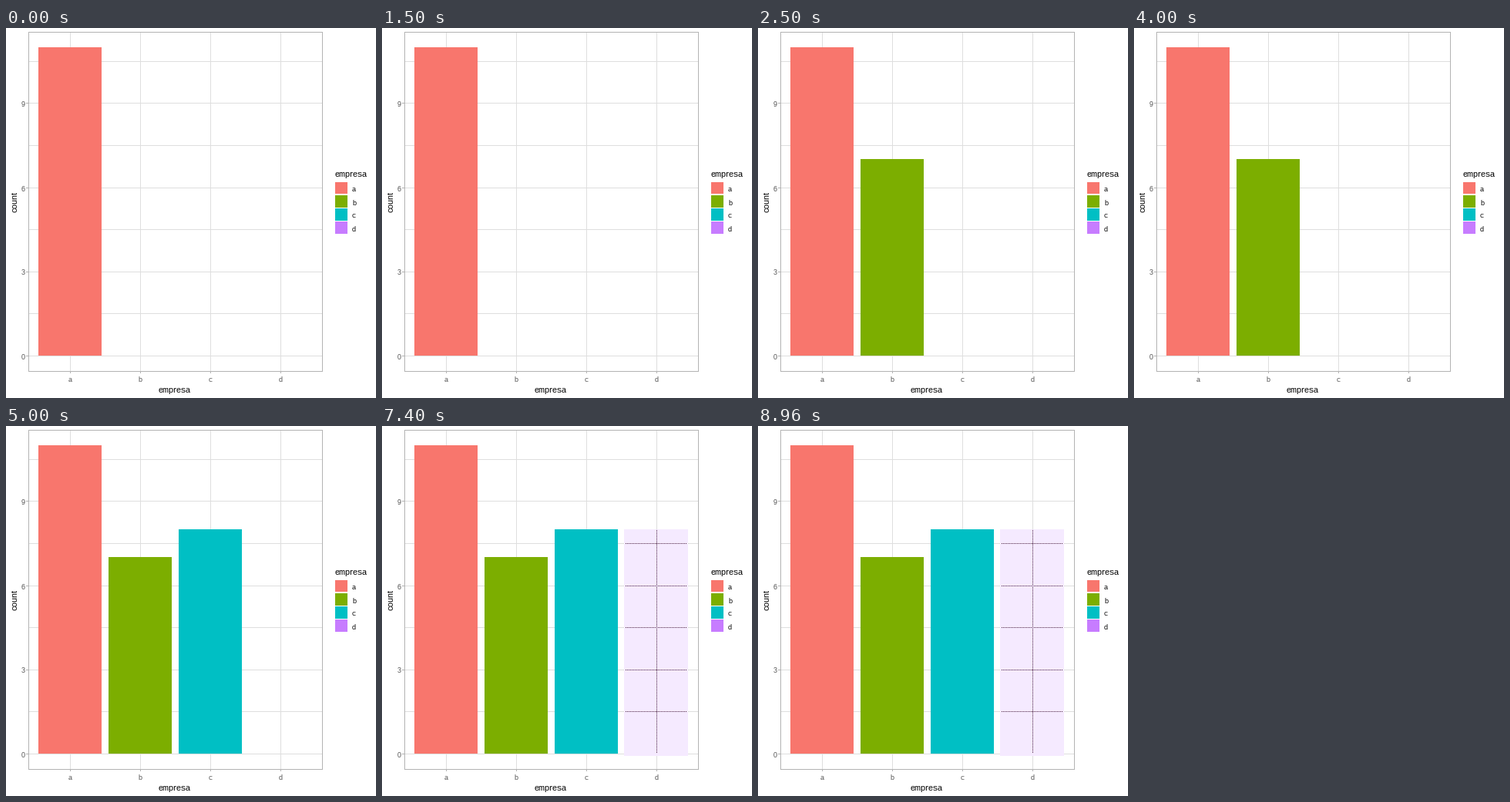
These frames come from a looping animation (480x480 px, 10 s). A matplotlib script:

```python
import matplotlib.pyplot as plt
from matplotlib.animation import FuncAnimation
from matplotlib.patches import Rectangle

SIZE, DPI = 480, 80
FRAMES, INTERVAL = 100, 100
GRID, BORDER, TICK_TEXT = "#DEDEDE", "#B3B3B3", "#4D4D4D"
COLORS = ["#F8766D", "#7CAE00", "#00BFC4", "#C77CFF"]
FADED, DOTS = "#F5EAFF", "#4A2040"
STARTS = [0, 2500, 5000, 7400]
CENTERS = [83, 174, 265, 356]
COUNTS = [11, 7, 8, 8]
LEFT, TOP, RIGHT, BOTTOM = 29, 5, 410, 445

plt.rcParams.update({
    "font.family": "Liberation Sans",
    "text.hinting": "default",
    "text.hinting_factor": 1,
})
fig = plt.figure(figsize=(SIZE / DPI, SIZE / DPI), dpi=DPI, facecolor="white")
ax = fig.add_axes([0, 0, 1, 1])
ax.set(xlim=(0, SIZE), ylim=(SIZE, 0))
ax.axis("off")


def y_of(count):
    """Pixel row of a value on the count axis."""
    return int(425.5 - count * 36.4)


def box(x0, y0, x1, y1, color, z=1):
    return ax.add_patch(Rectangle((x0, y0), x1 - x0, y1 - y0, fc=color,
                                  lw=0, antialiased=False, zorder=z))


def label(x, y, text, px, color="black", **kwargs):
    ax.text(x, y, text, fontsize=px * 72 / DPI, color=color,
            **{"va": "baseline", "zorder": 5, **kwargs})


def dotted_row(y, x0, x1):
    return [box(x, y, x + 1, y + 1, DOTS, 4) for x in range(x0, x1, 2)]


def dotted_column(x, y0, y1):
    return [box(x, y, x + 1, y + 1, DOTS, 4) for y in range(y0, y1, 2)]


def draw_panel():
    for half_steps in range(8):
        y = y_of(half_steps * 1.5)
        box(LEFT, y, RIGHT, y + 1, GRID)
        if half_steps % 2 == 0:
            box(LEFT - 3, y, LEFT, y + 1, BORDER)
            label(24.5, y + 4.5, str(half_steps * 3 // 2), 8.8, TICK_TEXT,
                  ha="right")
    for x, name in zip(CENTERS, "abcd"):
        box(x, TOP, x + 1, BOTTOM, GRID)
        box(x, BOTTOM, x + 1, BOTTOM + 3, BORDER)
        label(x, 459, name, 8.8, TICK_TEXT, ha="center")
    for y in (TOP, BOTTOM):
        box(LEFT, y, RIGHT + 1, y + 1, BORDER, 3)
    for x in (LEFT, RIGHT):
        box(x, TOP, x + 1, BOTTOM + 1, BORDER, 3)
    label(219, 473, "empresa", 11, ha="center")
    label(16, 225.5, "count", 11, rotation=90, ha="right", va="center")


def draw_legend():
    label(427, 193, "empresa", 11)
    for i, (name, color) in enumerate(zip("abcd", COLORS)):
        y = 200 + 17 * i
        box(427, y, 443, y + (16 if i in (1, 2, 3) else 15), color)
        label(449, y + 12.5, name, 8.8)


def draw_bars():
    """One list of artists per bar; the last bar is still fading in."""
    groups = [[box(x - 41, y_of(n), x + 41, 425, color, 2)]
              for x, n, color in zip(CENTERS[:3], COUNTS, COLORS)]
    x, top = CENTERS[3], y_of(COUNTS[3])
    faded = [box(x - 42, top, x + 41, 428, FADED, 2)]
    for count in (1.5, 3, 4.5, 6, 7.5):
        faded += dotted_row(y_of(count), x - 40, x + 40)
    faded += dotted_column(x, top + 1, 425)
    return groups + [faded]


draw_panel()
draw_legend()
bars = draw_bars()


def update(frame):
    now = frame * INTERVAL
    for start, group in zip(STARTS, bars):
        for artist in group:
            artist.set_visible(now >= start)
    return [artist for group in bars for artist in group]


anim = FuncAnimation(fig, update, frames=FRAMES, interval=INTERVAL,
                     repeat=True, repeat_delay=0, blit=False)
plt.show()
```
